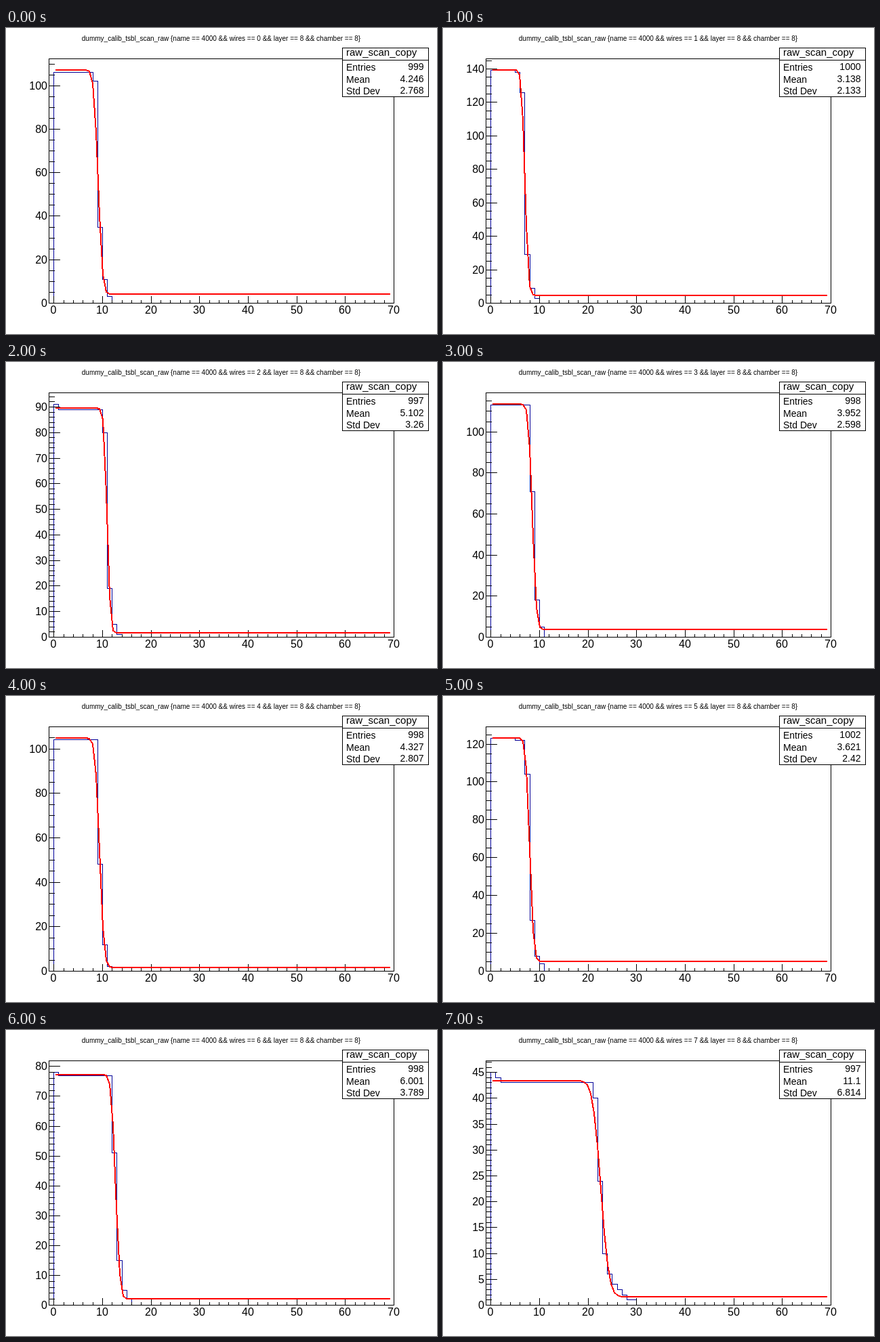
An HTML page that plays this animation: 636x452 px, repeating every 8 s.

```html
<!DOCTYPE html>
<html lang="en">
<head>
<meta charset="utf-8">
<title>Threshold scan</title>
<style>
  html, body { margin: 0; width: 100%; height: 100%; overflow: hidden; background: #fff; }
  svg { display: block; font-family: "Liberation Sans", Arial, sans-serif; }
  path, rect { fill: none; stroke: #000; shape-rendering: crispEdges; }
  .hist { stroke: #000099; }
  .fit { stroke: #f00; stroke-width: 2; stroke-linejoin: round; }
  .box { fill: #fff; }
  .axis { font-size: 16px; }
  .stats { font-size: 14px; }
  .mid { text-anchor: middle; }
  .end { text-anchor: end; }
</style>
</head>
<body>
<svg id="stage" width="636" height="452" viewBox="0 0 636 452"></svg>
<script>
const LEFT = 63, RIGHT = 572, TOP = 45, BOTTOM = 406;
const X_MIN = -1, X_MAX = 70, HOLD = 1000;

const repeat = (value, count) => Array(count).fill(value);

// Each scan: bin contents from x = 0, and a falling error-function fit.
const scans = [
  { bins: [...repeat(106, 8), 102, 35, 11, 3], high: 107, low: 3.9, mean: 9.22, sigma: 0.72 },
  { bins: [...repeat(139, 5), 138, 126, 29, 9, 3], high: 139.1, low: 4.6, mean: 7.13, sigma: 0.55 },
  { bins: [91, ...repeat(89, 9), 80, 19, 5, 1], high: 89.4, low: 1.6, mean: 11.05, sigma: 0.53 },
  { bins: [...repeat(113, 8), 71, 18, 5], high: 113.4, low: 3.5, mean: 8.65, sigma: 0.65 },
  { bins: [...repeat(104, 9), 48, 12, 2], high: 104.7, low: 1.6, mean: 9.51, sigma: 0.72 },
  { bins: [...repeat(123, 5), 122, 122, 104, 27, 8, 4], high: 123, low: 5.1, mean: 8.1, sigma: 0.63 },
  { bins: [78, ...repeat(77, 11), 51, 15, 5, 2], high: 77.1, low: 2, mean: 12.8, sigma: 0.7 },
  { bins: [45, 44, ...repeat(43, 19), 40, 24, 10, 6, 4, 3, 2, 1, 1], high: 43.3, low: 1.6, mean: 22.7, sigma: 1.33 }
];

const xAt = x => Math.round(LEFT + (x - X_MIN) / (X_MAX - X_MIN) * (RIGHT - LEFT));
const text = (x, y, label, cls = "") => `<text x="${x}" y="${y}" class="${cls}">${label}</text>`;
const short = n => String(Number(n.toPrecision(4)));

// Upper tail of the normal distribution.
const tail = z => 1 / (1 + Math.exp(1.5976 * z + 0.07056 * z ** 3));

function statistics(bins) {
  const entries = bins.reduce((sum, n) => sum + n, 0);
  const mean = bins.reduce((sum, n, i) => sum + n * i, 0) / entries;
  const variance = bins.reduce((sum, n, i) => sum + n * (i - mean) ** 2, 0) / entries;
  return [["Entries", entries], ["Mean", short(mean)], ["Std Dev", short(Math.sqrt(variance))]];
}

function axes(yMax, yAt) {
  const step = yMax > 100 ? 20 : yMax > 50 ? 10 : 5;
  const minor = { 20: 5, 10: 2, 5: 1 }[step];
  let ticks = `M${LEFT} ${TOP}H${RIGHT}V${BOTTOM}H${LEFT}Z`, labels = "";
  for (let x = 0; x <= X_MAX; x += 2) {
    const major = x % 10 === 0;
    ticks += `M${xAt(x)} ${BOTTOM}v${major ? -11 : -5}`;
    if (major) labels += text(xAt(x), 421.5, x, "axis mid");
  }
  for (let y = 0; y <= yMax; y += minor) {
    const major = y % step === 0;
    ticks += `M${LEFT} ${yAt(y)}h${major ? 16 : 8}`;
    if (major) labels += text(61, yAt(y) + 6, y, "axis end");
  }
  return `<path d="${ticks}" transform="translate(.5 .5)"/>` + labels;
}

function statsBox(bins) {
  const rows = statistics(bins).map(([name, value], i) =>
    text(502, [63, 81, 98][i], name, "stats") + text(616.5, [62, 80, 97][i], value, "stats end"));
  return `<rect class="box" x="496.5" y="29.5" width="127" height="72"/><path d="M496 47.5H624"/>` +
    `<text x="502" y="41" font-size="15">raw_scan_copy</text>` + rows.join("");
}

function draw(index) {
  const { bins, high, low, mean, sigma } = scans[index];
  const yMax = 1.05 * Math.max(high, ...bins);
  const yAt = y => Math.round(BOTTOM - y / yMax * (BOTTOM - TOP));

  const steps = bins.map((n, i) => `V${yAt(n)}H${xAt(i + 1)}`).join("");
  const curve = Array.from({ length: 100 }, (_, i) => {
    const x = 0.45 + i * 0.6955;
    return `${xAt(x)} ${yAt(low + (high - low) * tail((x - mean) / sigma))}`;
  });
  const title = `dummy_calib_tsbl_scan_raw {name == 4000 &amp;&amp; wires == ${index} ` +
    `&amp;&amp; layer == 8 &amp;&amp; chamber == 8}`;

  document.getElementById("stage").innerHTML =
    `<text x="317.5" y="19" font-size="10" class="mid">${title}</text>` +
    `<path class="hist" d="M${xAt(0)} ${BOTTOM}${steps}V${BOTTOM}" transform="translate(.5 .5)"/>` +
    axes(yMax, yAt) +
    `<path class="fit" d="M${curve.join("L")}"/>` +
    statsBox(bins);
}

const start = performance.now();
let shown = -1;
function tick() {
  const index = Math.floor((performance.now() - start) / HOLD) % scans.length;
  if (index !== shown) draw(shown = index);
  requestAnimationFrame(tick);
}
tick();
</script>
</body>
</html>
```
